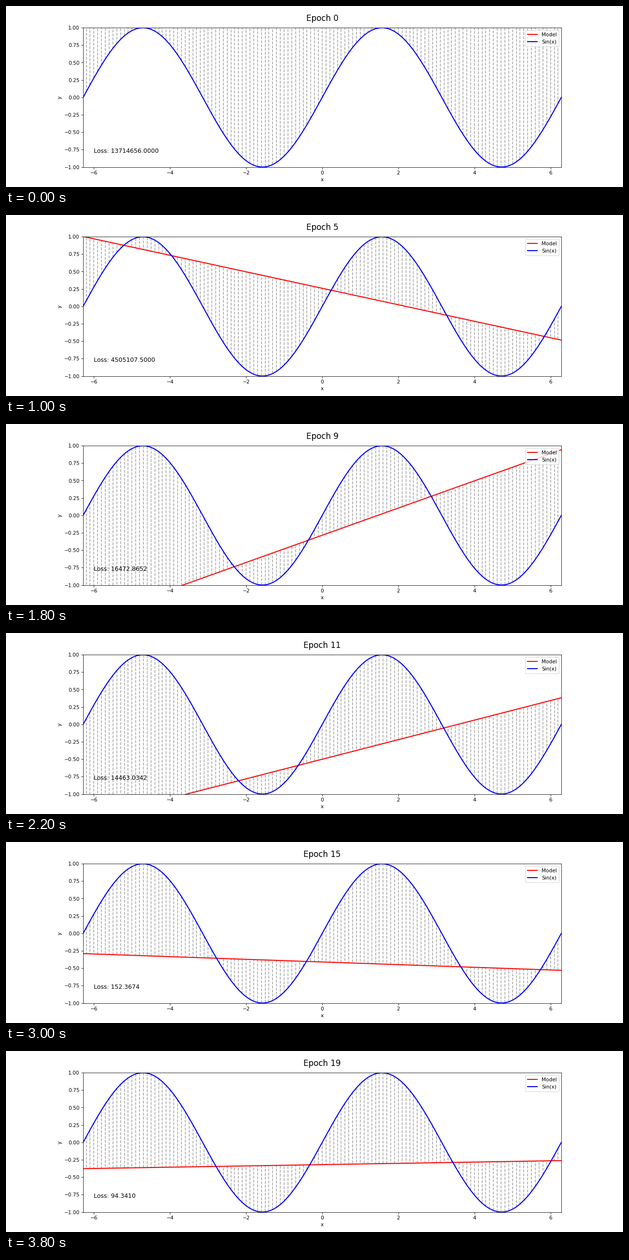
A matplotlib script that plays this animation: 1280 px wide and 376 px high, repeating every 4000 ms.

```python
import matplotlib.pyplot as plt
import numpy as np
from matplotlib.animation import FuncAnimation

EPOCHS = 20
LIMIT = 1.5  # residuals are cut off just outside the axes

# Key points of the training: epoch, slope swing, intercept, loss.
KEYS = np.array([
    (0, 3, 120, 13714656),
    (2, 6.85, 27.49, 3119623.5),
    (4, -1, 0.6, 3900000),
    (5, -0.1183, 0.26, 4505107.5),
    (7, 0.4, -0.1, 90000),
    (9, 0.1952, -0.285, 16472.8652),
    (11, 0.1404, -0.5, 14463.0342),
    (15, -0.0191, -0.41, 152.3674),
    (19, 0.0092, -0.319, 94.341),
]).T


def training_state(epoch):
    """The slope overshoots to the other side each epoch; the loss decays."""
    when, swings, intercepts, losses = KEYS
    side = 1 if epoch % 2 else -1
    slope = side * np.interp(epoch, when, swings)
    intercept = np.interp(epoch, when, intercepts)
    loss = np.float32(np.exp(np.interp(epoch, when, np.log(losses))))
    return slope, intercept, loss


fig, ax = plt.subplots(figsize=(17, 4.99375), dpi=75.2942)
ax.set_xlim(-2 * np.pi, 2 * np.pi)
ax.set_ylim(-1, 1)
ax.set_xlabel("x")
ax.set_ylabel("y")

x = np.arange(-100, 101) / 10
y = np.sin(x)

residuals = ax.vlines(x, y, y, colors="gray", linestyles="dashed",
                      linewidth=1.5, alpha=0.7, zorder=1)
model, = ax.plot([], [], color="red", lw=2, label="Model")
ax.plot(x, y, color="blue", lw=2, label="Sin(x)")
ax.legend(loc="upper right")

title = ax.text(0.5, 1.049, "", transform=ax.transAxes, ha="center", fontsize=16)
loss_text = ax.text(-6, -0.797, "", fontsize=12)


def update(epoch):
    slope, intercept, loss = training_state(epoch)
    fit = slope * x + intercept
    ends = np.clip(fit, -LIMIT, LIMIT)
    model.set_data(x, fit)
    residuals.set_segments([[(u, a), (u, b)] for u, a, b in zip(x, y, ends)])
    title.set_text(f"Epoch {epoch}")
    loss_text.set_text(f"Loss: {loss:.4f}")
    return model, residuals, title, loss_text


anim = FuncAnimation(fig, update, frames=EPOCHS, interval=200,
                     init_func=lambda: update(0), repeat=True, repeat_delay=0)
plt.show()
```
